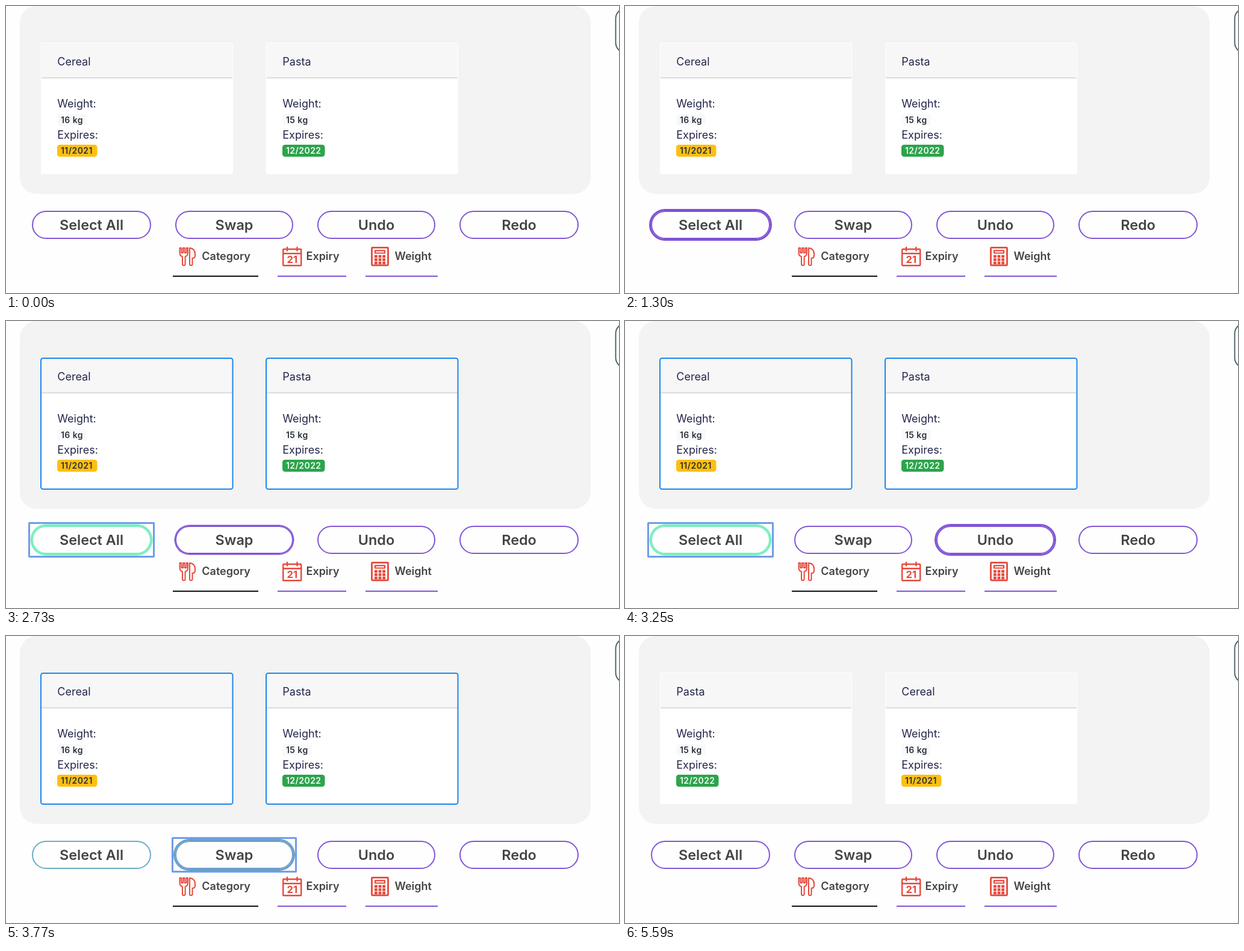
An HTML page for the animation above (5720 ms loop, 1018 by 478 pixels).

```html
<!DOCTYPE html>
<html lang="en">
<head>
<meta charset="utf-8">
<title>Pantry shelf</title>
<style>
  html, body { margin: 0; width: 100%; height: 100%; overflow: hidden; background: #fefefe; }
  body { position: relative; font-family: Inter, "Open Sans", sans-serif; }
  svg { position: absolute; left: 0; top: 0; }

  .card, .frame, .btn, .btn::before { animation: 5720ms step-end infinite; }

  .label { font-size: 18px; fill: #23264a; }
  .badge { font-size: 14px; font-weight: 600; letter-spacing: .45px; fill: #2b2f38; }
  .pasta .date { fill: #f4fbf5; }
  .frame { fill: none; stroke: #1c86ee; stroke-width: 2; animation-name: select; }
  .cereal { animation-name: to-right; }
  .pasta { animation-name: to-left; }

  .btn {
    --violet: #8155d6; --mint: #78edbd;
    position: absolute; top: 341px; width: 196px; height: 47px;
    box-sizing: border-box; border: 2px solid currentColor; border-radius: 24px;
    color: var(--violet); font: 600 23.4px/43px Inter, "Open Sans", sans-serif; text-align: center;
  }
  .btn::before {
    content: ""; position: absolute; inset: -8px; border: 3px solid #6f9ee9;
    border-radius: 2px; opacity: 0; box-shadow: 0 0 1px #6f9ee9;
  }
  .btn span { position: relative; color: #444; }
  .all { left: 43px; width: 198px; animation-name: all; }
  .all::before { animation-name: all-ring; }
  .swap { left: 281px; animation-name: swap; }
  .swap::before { animation-name: swap-ring; }
  .undo { left: 517px; animation-name: undo; }
  .redo { left: 753px; width: 198px; }

  @keyframes to-right {
    0% { transform: translate(0, 0); }
    70.45%, 100% { transform: translate(374px, 0); }
  }
  @keyframes to-left {
    0% { transform: translate(374px, 0); }
    70.45%, 100% { transform: translate(0, 0); }
  }
  @keyframes select {
    0%, 70.45%, 100% { opacity: 0; }
    34.09% { opacity: 1; }
  }
  @keyframes all {
    0%, 70.45%, 100% { color: var(--violet); box-shadow: none; }
    18.18% { color: #7f51d6; box-shadow: 0 0 0 3px; }
    34.09% { color: var(--mint); box-shadow: 0 0 0 2.5px; }
    65.9% { color: #68aec4; box-shadow: none; }
    68.18% { color: #7a72d0; box-shadow: none; }
  }
  @keyframes all-ring {
    0%, 65.9%, 100% { opacity: 0; }
    34.09% { opacity: 1; }
  }
  @keyframes swap {
    0%, 54.54%, 97.72%, 100% { color: var(--violet); box-shadow: none; }
    47.72% { color: var(--violet); box-shadow: 0 0 0 1.5px; }
    50%, 63.63% { color: #7f51d6; box-shadow: 0 0 0 3px; }
    65.9% { color: #6b9fc9; box-shadow: 0 0 0 3px; }
    68.18%, 70.45% { color: var(--mint); box-shadow: 0 0 0 2.5px; }
  }
  @keyframes swap-ring {
    0%, 97.72%, 100% { opacity: 0; }
    65.9% { opacity: 1; }
  }
  @keyframes undo {
    0%, 63.63%, 100% { box-shadow: none; }
    54.54%, 61.36% { box-shadow: 0 0 0 1.5px; }
    56.81% { box-shadow: 0 0 0 3px; }
  }
</style>
</head>
<body>
<svg width="1018" height="478" viewBox="0 0 1018 478">
  <defs>
    <g id="sheet">
      <rect x="58" y="61" width="319" height="219" rx="4" fill="#fff"/>
      <path d="M59 119V65a3 3 0 0 1 3-3H373a3 3 0 0 1 3 3V119z" fill="#f7f7f7"/>
      <path d="M59 119.7H376" stroke="#d6d7d8" stroke-width="1.8"/>
      <rect x="85" y="180" width="49" height="19" rx="4" fill="#f8f9fa"/>
      <text class="label" x="85.3" y="168.5">Weight:</text>
      <text class="label" x="85.3" y="220.5">Expires:</text>
    </g>
    <rect id="edge" x="58" y="62" width="318.5" height="218" rx="3.5"/>
  </defs>

  <rect x="23" y="0" width="948" height="313" rx="28" fill="#f2f3f2"/>
  <rect x="1012.5" y="4" width="80" height="74" rx="17" fill="none" stroke="#3f5a62" stroke-width="1.8"/>

  <g class="card cereal">
    <use href="#sheet"/>
    <text class="label" x="85.3" y="98.5">Cereal</text>
    <text class="badge" x="91" y="194.7">16 kg</text>
    <rect x="85" y="231" width="66.5" height="20" rx="4.5" fill="#fdbf12"/>
    <text class="badge date" x="91" y="246.3">11/2021</text>
    <use class="frame" href="#edge"/>
  </g>
  <g class="card pasta">
    <use href="#sheet"/>
    <text class="label" x="85.3" y="98.5">Pasta</text>
    <text class="badge" x="91" y="194.7">15 kg</text>
    <rect x="85" y="231" width="70.5" height="20" rx="4.5" fill="#2ca44c"/>
    <text class="badge date" x="91" y="246.3">12/2022</text>
    <use class="frame" href="#edge"/>
  </g>

  <g fill="none" stroke="#e5493c" stroke-width="2" stroke-linejoin="round" stroke-linecap="round">
    <!-- fork and knife -->
    <path d="M288.5 403V411Q288.5 416 293 417.5V430Q293 432 295.3 432T297.6 430V417.5Q302 416 302 411V403H299.5V411H296.7V403H294V411H291.2V403z"/>
    <path d="M305 403Q314 404 314 413V416Q314 420 309.5 420V430Q309.5 432 307.2 432T305 430z"/>
    <!-- calendar -->
    <g stroke-width="2.4">
      <rect x="460.2" y="405" width="30" height="27.3" rx="1"/>
      <path d="M460.2 412.3H490.2M467 402V407.5M483.5 402V407.5"/>
    </g>
    <!-- calculator -->
    <g stroke-width="2.8">
      <rect x="607.5" y="402.3" width="27" height="29.5" rx="1"/>
      <rect x="613" y="407.3" width="16" height="4.2" stroke-width="2.2"/>
      <path d="M612 417H630M612 422.5H630M612 428H630" stroke-width="4.4" stroke-linecap="butt" stroke-dasharray="4.8 1.8"/>
    </g>
  </g>
  <text x="475.3" y="428" text-anchor="middle" font-size="16.5" font-weight="700" fill="#e5493c">21</text>

  <g font-size="18" font-weight="600" fill="#444">
    <text x="325.3" y="422.6">Category</text>
    <text x="498.5" y="422.6">Expiry</text>
    <text x="645.5" y="422.6">Weight</text>
  </g>
  <g stroke-width="2">
    <path d="M277 450H419" stroke="#111"/>
    <path d="M451 450H565M597 450H717" stroke="#8155d6"/>
  </g>
</svg>

<div class="btn all"><span>Select All</span></div>
<div class="btn swap"><span>Swap</span></div>
<div class="btn undo"><span>Undo</span></div>
<div class="btn redo"><span>Redo</span></div>
</body>
</html>
```
